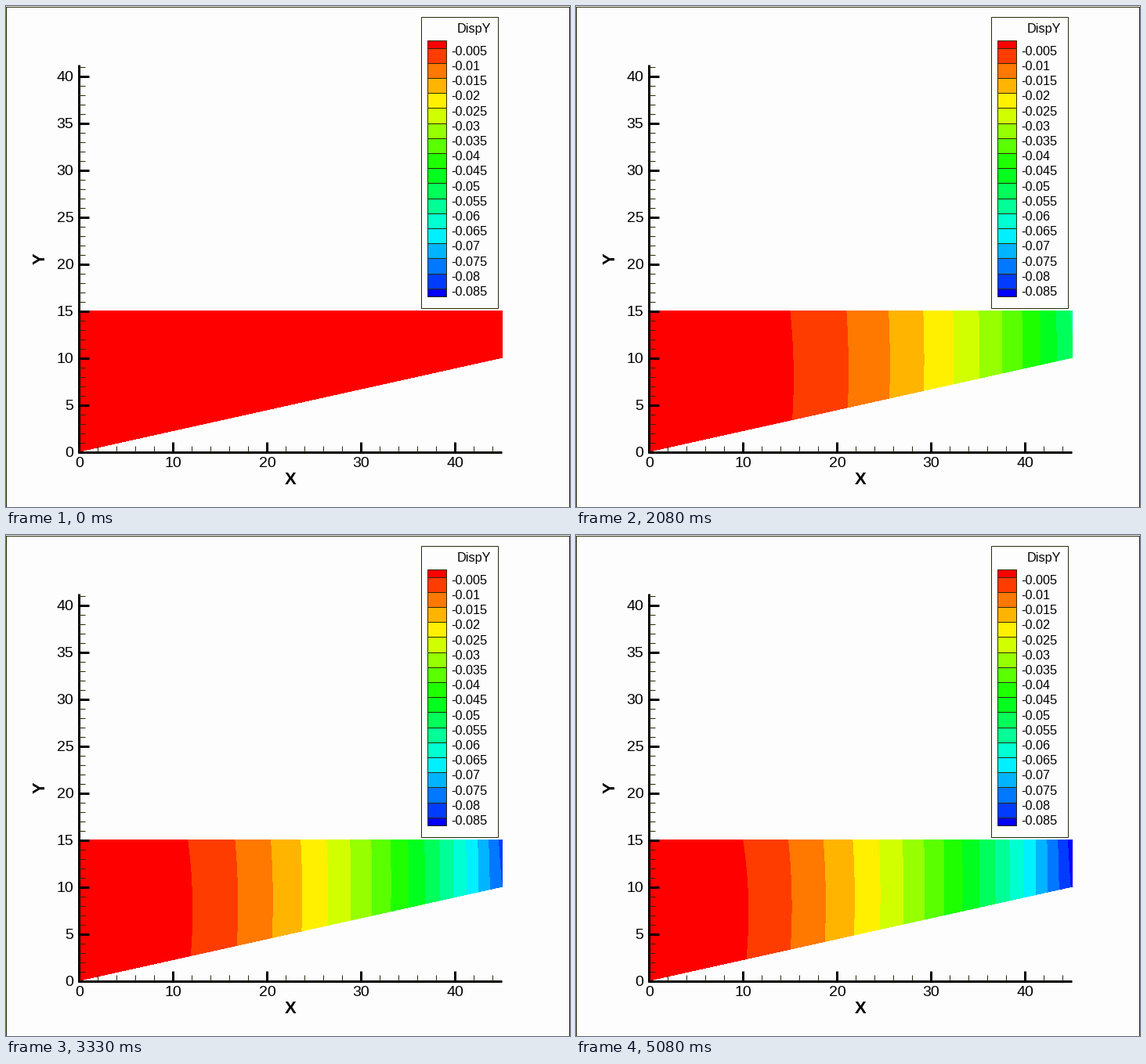
Recreate the animation shown at these times as a matplotlib script. Size 720 by 640 pixels, loop 5160 ms.

```python
import numpy as np
import matplotlib.pyplot as plt
from matplotlib.animation import FuncAnimation
from matplotlib.patches import Rectangle

W, H, DPI = 720, 640, 100
LOOP, FRAMES = 5160, 62
X0, Y0, UNIT = 93.5, 569.5, 12      # plot origin and pixels per unit
LENGTH, DEPTH, RISE = 45, 15, 10    # tapered beam
PT = 72 / DPI
INK, THIN, PAPER = "black", "#2a2a08", "#fdfdfd"

plt.rcParams["font.family"] = "Liberation Sans"

LEVELS = np.arange(5, 90, 5)        # thousandths


def rainbow(u):
    """Red, yellow, green, cyan, blue for u from 0 to 1."""
    return (np.clip(2 - 4 * u, 0, 1),
            np.clip(2 - abs(4 * u - 2), 0, 1),
            np.clip(4 * u - 2, 0, 1))


COLORS = [rainbow(u) for u in np.linspace(0, 1, len(LEVELS) + 1)]

fig = plt.figure(figsize=(W / DPI, H / DPI), dpi=DPI, facecolor=PAPER)
ax = fig.add_axes([0, 0, 1, 1])
# The small shift makes half-pixel coordinates snap to their own pixel
ax.set_xlim(0.1, W + 0.1)
ax.set_ylim(H - 0.1, -0.1)
ax.axis("off")


def line(x1, y1, x2, y2, width=1, color=THIN):
    ax.plot([x1, x2], [y1, y2], color=color, lw=width * PT,
            solid_capstyle="butt", zorder=3)


def text(x, y, s, size, **kw):
    """Text whose capitals are centred on height y."""
    ax.text(x, y + 0.35 * size, s, fontsize=size * PT, color=INK,
            va="baseline", zorder=4, **kw)


def box(x, y, w, h, face="none", edge=THIN, z=2):
    ax.add_patch(Rectangle((x, y), w, h, facecolor=face, edgecolor=edge,
                           lw=PT, zorder=z))


def draw_axes():
    right = X0 + UNIT * LENGTH
    line(X0, 75, X0, Y0 + 1.5, 3, INK)
    line(X0 - 1.5, Y0, right, Y0, 3, INK)
    for v in range(42):
        y = Y0 - UNIT * v
        if v % 5:
            line(X0, y, X0 + 7.5, y)
        else:
            line(X0, y, X0 + 12.5, y, 3, INK)
            text(86.5, y, str(v), 19.5, ha="right")
    for v in range(0, LENGTH, 2):
        x = X0 + UNIT * v
        if v % 10:
            line(x, Y0, x, Y0 - 7.5)
        else:
            line(x, Y0, x, Y0 - 12.5, 3, INK)
            text(x, 582, str(v), 19.5, ha="center")
    text(363.5, 603.5, "X", 22, ha="center", weight="bold")
    ax.text(44.5, 322.5, "Y", fontsize=22 * PT, weight="bold", rotation=90,
            ha="center", va="center", color=INK)


def draw_legend():
    box(530.5, 13.5, 98, 372, face=PAPER)
    text(597, 28.5, "DispY", 16.2, ha="center")
    step = 19.2
    edges = [43.5, *(53.5 + step * np.arange(len(LEVELS))), 370.5]
    for top, bottom, color in zip(edges, edges[1:], COLORS):
        box(538.5, top, 24, bottom - top, face=color)
    for i, level in enumerate(LEVELS):
        text(568, 57 + step * i, f"{-level / 1000:g}", 16.2, ha="left")


# Beam grid: s along the span, h from the top edge down
s, h = np.meshgrid(np.linspace(0, 1, 181), np.linspace(0, 1, 25))
grid_x = X0 + UNIT * LENGTH * s
grid_y = Y0 - 0.5 - UNIT * (DEPTH - h * (DEPTH - RISE * s))

# Contours bulge near the support and lean a little at the tip
bulge = 7 * np.exp(-np.maximum(grid_x - 220, 0) / 130) * (3.27 * h - 2.67 * h**2)
lean = 4 * h * np.exp((s - 1) * UNIT * LENGTH / 15)
span = np.clip(s - (bulge + lean) / (UNIT * LENGTH), 0, 1)
FINAL = 4.5 * span + 73.8 * span**2 + 8.8 * span**9

# Share of the final tip deflection reached at a few times
TIP_TIMES = 0, 1420, 2080, 2830, 3330, 4330
TIP_SHARE = 0.03, 0.51, 0.637, 0.843, 0.937, 1


def deflection(t):
    """Bending starts at the loaded tip, spreads inward, then rings."""
    delay = 4.2 * np.exp(-(t / 1400) ** 3)
    ringing = 0.29 - 0.00008 * t - 0.08 * np.cos(2 * np.pi * (t - 2960) / 875)
    share = np.interp(t, TIP_TIMES, TIP_SHARE)
    return share * FINAL * np.maximum(span, 1e-6) ** (delay + ringing)


def update(i):
    for old in list(ax.collections):
        old.remove()
    t = i * 250 / 3
    ax.contourf(grid_x, grid_y, deflection(t), levels=[-100, *LEVELS, 200],
                colors=COLORS, antialiased=False, zorder=1)
    return []


box(0.5, 0.5, W - 1, H - 1)
draw_axes()
draw_legend()
anim = FuncAnimation(fig, update, frames=FRAMES, interval=LOOP / FRAMES,
                     init_func=lambda: [], repeat=True, repeat_delay=0)
plt.show()
```
